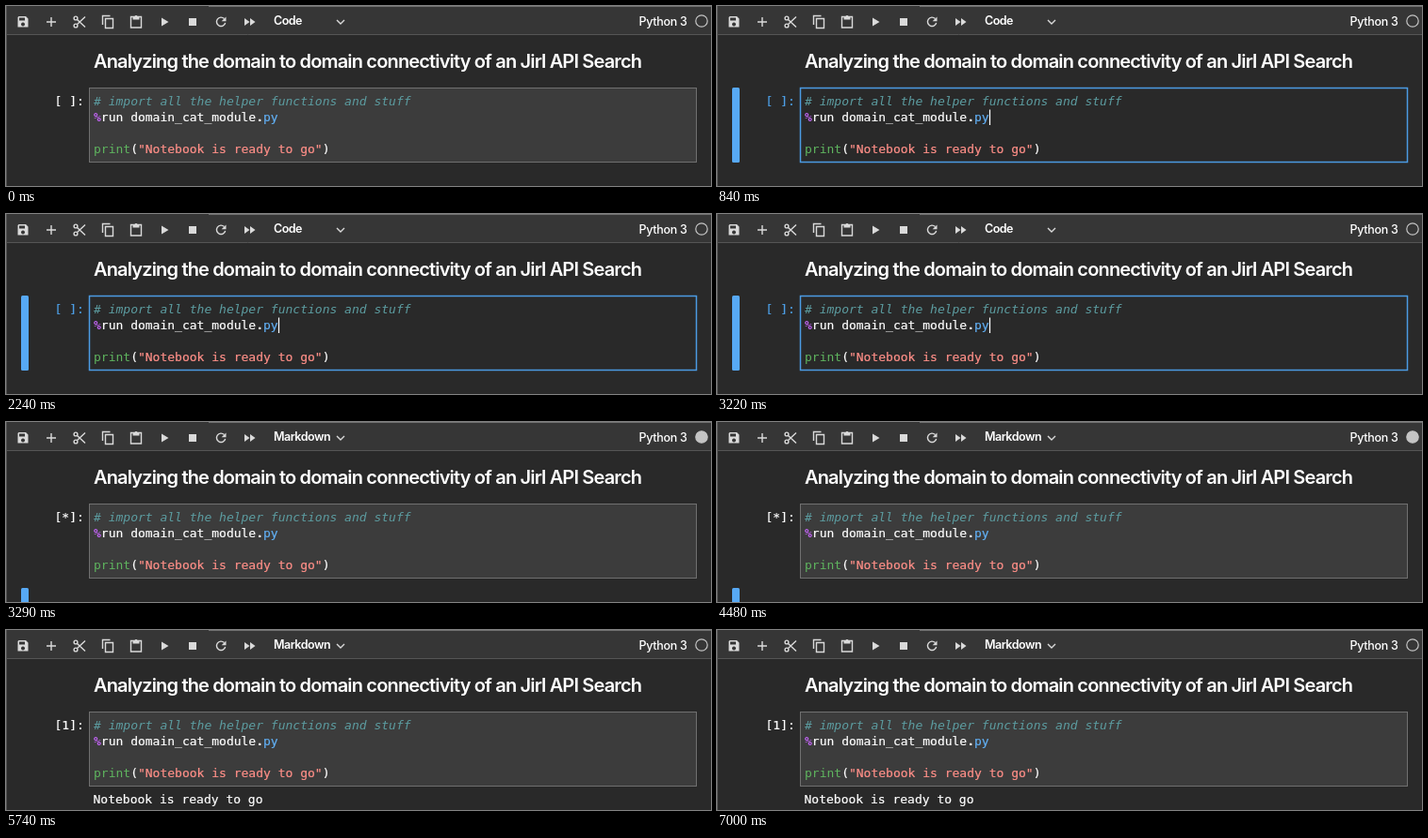
Write an HTML page that moves like this. It is 748 px wide and 192 px high and loops after 7070 ms.

```html
<!DOCTYPE html>
<html lang="en">
<head>
<meta charset="utf-8">
<title>Notebook cell run</title>
<style>
html, body { margin: 0; width: 100%; height: 100%; overflow: hidden; background: #292929; }
svg { display: block; }
text { white-space: pre; fill: #fff; }
.ui { font: 500 12.5px Inter, sans-serif; letter-spacing: -.3px; }
#mode { font-weight: 600; letter-spacing: -.5px; }
.title { font: 600 20px Inter, sans-serif; letter-spacing: -.84px; }
.code { font: 13px "DejaVu Sans Mono", monospace; }
.code text { stroke: currentColor; stroke-width: .2px; color: #fff; }
.code .comment { fill: #5c9ca0; stroke: none; font-style: italic; }
.magic { fill: #c264f5; stroke: none; font-weight: bold; }
.op { font-weight: bold; }
.prop { fill: #62b0f5; stroke: #62b0f5; }
.call { fill: #5fb55f; stroke: none; }
.string { fill: #ff8f88; stroke: #ff8f88; }
.icon { fill: #dadada; }
.line { fill: none; stroke: #dadada; stroke-width: 1.4; }
</style>
</head>
<body>
<svg width="748" height="192" viewBox="0 0 748 192">
  <rect width="748" height="192" fill="#292929"/>
  <rect width="748" height="30" fill="#363636"/>
  <path d="M0 30.500H748M.5 0V192" stroke="#555" fill="none"/>
  <path d="M215 .5H748" stroke="#707070"/>

  <!-- toolbar -->
  <path class="icon" fill-rule="evenodd" d="M13.500 11h7.500l2.500 2.500v9h-11v-10.500zM14 12.500v3h6v-3zM18 17.500a2 2 0 1 0 .01 0z"/>
  <path class="line" d="M48 12V22M43 17H53"/>
  <g class="line">
    <circle cx="74" cy="13" r="1.900"/><circle cx="74" cy="21" r="1.900"/>
    <path d="M75.500 14.500L84 22.500M75.500 19.500L84 11.500"/>
  </g>
  <path class="line" d="M102.500 20V10.500H110.500M105.500 13.500H113.500V23.500H105.500Z"/>
  <path class="line" d="M132.500 11.500H143.500V23H132.500Z"/>
  <path class="icon" d="M134.500 11H136.500A1.600 1.600 0 0 1 139.500 11H141.500V14.500H134.500Z"/>
  <path class="icon" d="M165 12.500L172.500 17L165 21.500ZM194 13H202V21H194ZM253 13L258.500 17L253 21ZM259 13L264.500 17L259 21Z"/>
  <path class="line" d="M231.500 13.500A4.700 4.700 0 1 0 232.700 18"/>
  <path class="icon" d="M233.500 11.500V16.300H228.700Z"/>
  <text id="mode" class="ui" x="284" y="20"></text>
  <path class="line" d="M351 15L355 19L359 15"/>
  <text class="ui" x="671.500" y="21">Python 3</text>
  <circle id="kernel" cx="738" cy="16" r="6.200" stroke="#c4c4c4" stroke-width="1.200"/>

  <text class="title" x="93" y="66">Analyzing the domain to domain connectivity of an Jirl API Search</text>

  <!-- cell -->
  <rect id="bar" x="16" width="8" height="80" rx="1.500" fill="#57a9f5"/>
  <rect id="editor" x="88.500" y="87.500" width="644" height="79"/>
  <g class="code">
    <text id="prompt" x="51.500" y="106"></text>
    <text class="comment" x="93" y="106"># import all the helper functions and stuff</text>
    <text x="93" y="123"><tspan class="magic">%</tspan>run domain_cat_module<tspan class="op">.</tspan><tspan class="prop">py</tspan></text>
    <text x="93" y="157"><tspan class="call">print</tspan>(<tspan class="string">"Notebook is ready to go"</tspan>)</text>
    <text id="output" x="92.500" y="185">Notebook is ready to go</text>
  </g>
  <path id="cursor" d="M289.500 110.500V127" stroke="#fff" stroke-width="1.200"/>
</svg>
<script>
const LOOP = 7070, FOCUS = 770, RUN = 3290, DONE = 5390;
const $ = id => document.getElementById(id);
const set = (id, attrs) => {
  for (const name in attrs) $(id).setAttribute(name, attrs[name]);
};
const show = (id, visible) => set(id, { visibility: visible ? 'visible' : 'hidden' });
const within = (t, from, to) => t >= from && t < to;

function draw(now) {
  const t = now % LOOP;
  const focused = within(t, FOCUS, RUN);
  const busy = within(t, RUN, DONE);
  const cursorOn = within(t, FOCUS, 1470) || within(t, 1890, 2450) || within(t, 3010, RUN);

  $('mode').textContent = t < RUN ? 'Code' : 'Markdown';
  $('prompt').textContent = t < RUN ? '[ ]:' : busy ? '[*]:' : '[1]:';
  $('prompt').style.color = $('prompt').style.fill = focused ? '#4d9fe6' : '#fff';
  set('kernel', { fill: busy ? '#c4c4c4' : 'none' });
  set('editor', {
    fill: focused ? '#292929' : '#3c3c3c',
    stroke: focused ? '#4b9be3' : '#707070',
    'stroke-width': focused ? 1.5 : 1
  });
  set('bar', { y: focused ? 87 : 177 });
  show('bar', focused || busy);
  show('cursor', cursorOn);
  show('output', t >= DONE);
  requestAnimationFrame(draw);
}
draw(performance.now());
</script>
</body>
</html>
```
